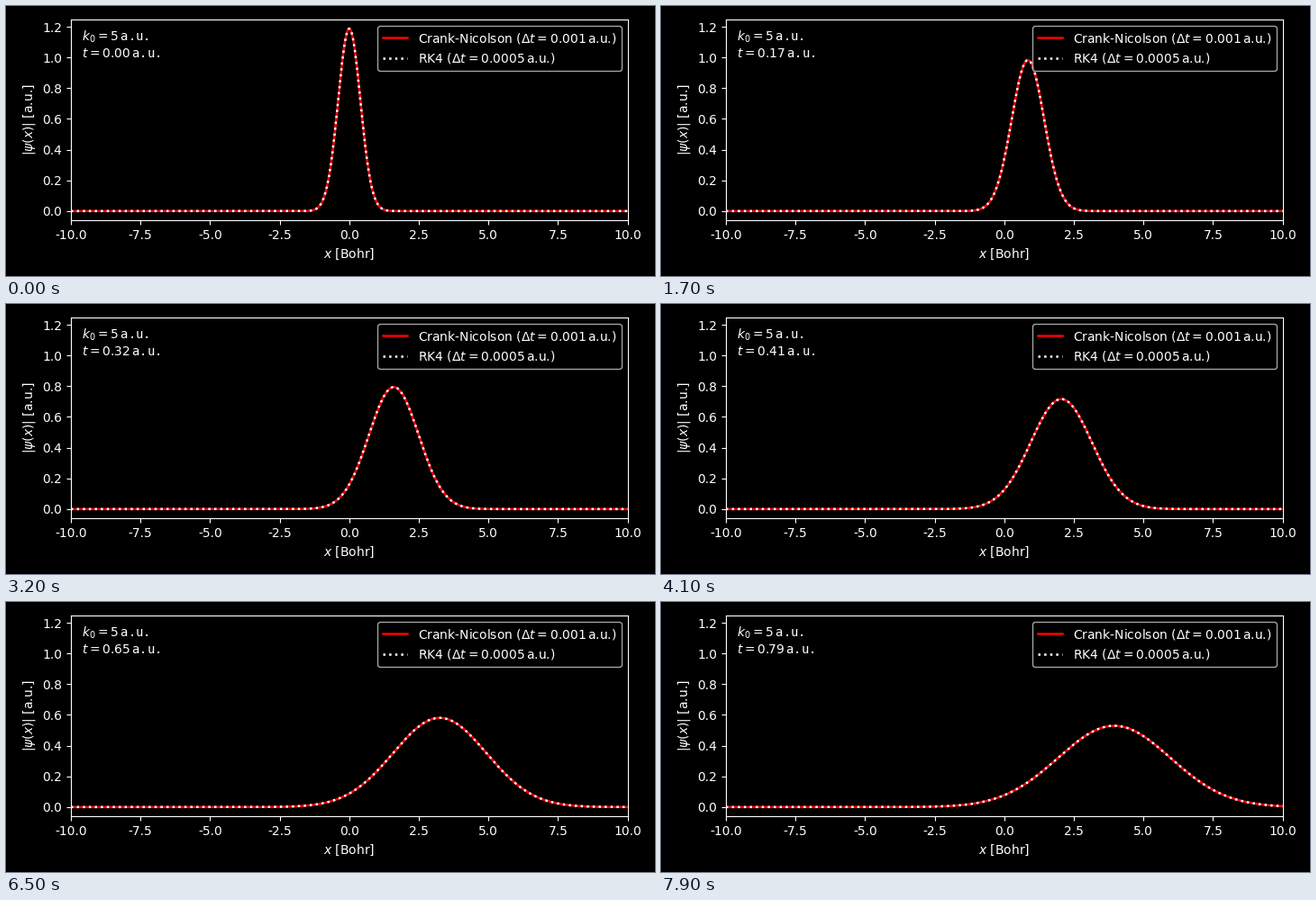
These frames come from a looping animation (720 px wide and 300 px high, 8 s). A matplotlib script:

```python
import numpy as np
import matplotlib.pyplot as plt
from matplotlib.animation import FuncAnimation

FRAMES, INTERVAL = 80, 100
DT = 0.01      # simulated time per frame, a.u.
K0 = 5         # mean momentum
WIDTH = 0.4    # initial packet width, Bohr

plt.style.use("dark_background")
plt.rcParams["font.family"] = "DejaVu Sans"
plt.rcParams["axes.unicode_minus"] = False

x = np.linspace(-10, 10, 1001)


def packet(t):
    """Modulus of a freely spreading Gaussian wave packet."""
    var = WIDTH**2 + (t / WIDTH) ** 2
    return (np.pi * var) ** -0.25 * np.exp(-((x - K0 * t) ** 2) / (2 * var))


def clock(t):
    return rf"$t={t:.2f}\,$a.u."


def curve(style, label):
    return ax.plot(x, packet(0), style, lw=1.8, label=label)[0]


def note(y, text):
    return ax.text(0.02, y, text, family="DejaVu Sans Mono",
                   transform=ax.transAxes)


fig, ax = plt.subplots(figsize=(7.2, 3), dpi=100)
lines = [
    curve("r-", r"Crank-Nicolson ($\Delta t=0.001\,$a.u.)"),
    curve("w:", r"RK4 ($\Delta t=0.0005\,$a.u.)"),
]
ax.set_xlim(-10, 10)
ax.set_ylim(ax.get_ylim())
ax.set_xlabel(r"$x$ [Bohr]")
ax.set_ylabel(r"$|\psi(x)|$ [a.u.]")
ax.legend(loc="upper right")
note(0.892, rf"$k_0={K0}\,$a.u.")
time_text = note(0.812, clock(0))
fig.tight_layout()
fig.subplots_adjust(left=72 / 720, bottom=62 / 300)


def update(i):
    t = i * DT
    for line in lines:
        line.set_ydata(packet(t))
    time_text.set_text(clock(t))
    return [*lines, time_text]


anim = FuncAnimation(fig, update, frames=FRAMES, interval=INTERVAL,
                     repeat=True, repeat_delay=0)
plt.show()
```
